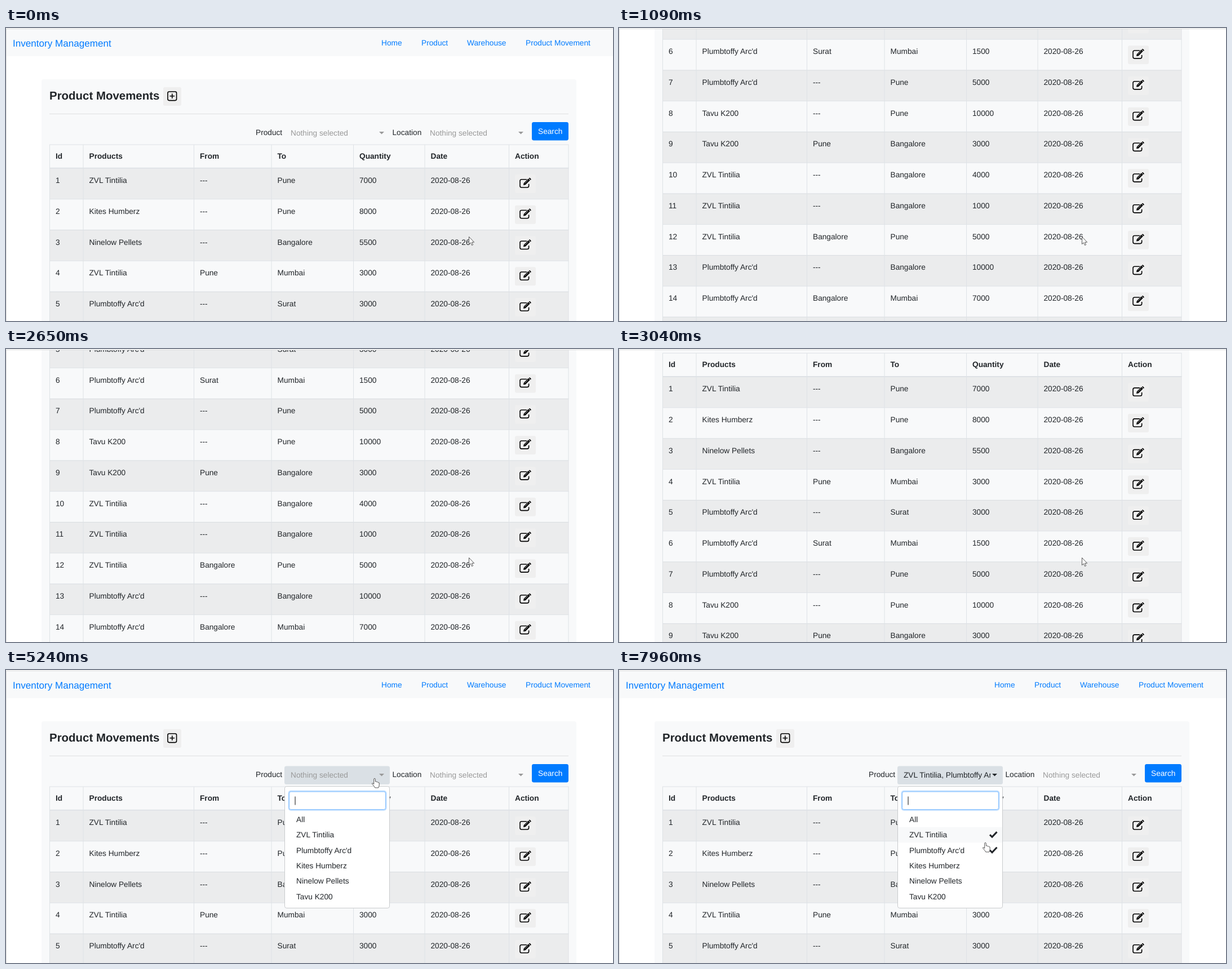
An HTML page that plays this animation: 1077 by 520 pixels, repeating every 8 s.

```html
<!DOCTYPE html>
<html lang="en">
<head>
<meta charset="utf-8">
<title>Inventory Management</title>
<style>
  html, body { margin: 0; width: 100%; height: 100%; overflow: hidden; background: #fff; }
  svg { display: block; width: 1077px; height: 520px; }
  text {
    font: 13.7px "Liberation Sans", Arial, sans-serif; fill: #212529;
    white-space: pre; text-rendering: geometricPrecision;
  }
  .bold { font-weight: bold; }
  .link { fill: #007bff; }
  .brand { font-size: 17.1px; fill: #007bff; }
  .title { font-size: 20.45px; font-weight: bold; }
  .hint { fill: #999; }
  .light { fill: #fff; }
</style>
</head>
<body>
<svg id="stage" viewBox="0 0 1077 520"></svg>
<script>
const PRODUCTS = ["ZVL Tintilia", "Plumbtoffy Arc'd", "Kites Humberz", "Ninelow Pellets", "Tavu K200"];
const CITIES = { "-": "---", P: "Pune", B: "Bangalore", M: "Mumbai", S: "Surat", H: "Hyderabad" };
// product index, from, to, quantity
const MOVES = ("0-P7000 2-P8000 3-B5500 0PM3000 1-S3000 1SM1500 1-P5000 4-P10000 " +
  "4PB3000 0-B4000 0-B1000 0BP5000 1-B10000 1BM7000 0PS1000 2-H1000").split(" ");
const HEADS = ["Id", "Products", "From", "To", "Quantity", "Date", "Action"];
const EDGES = [77.5, 137, 333.5, 471, 616.5, 743, 892.5, 998];
const ROW = 54.75, ROWS_TOP = 249, ITEM = 27.4, ITEMS_TOP = 251.5;
const LOOP = 8000, BOTTOM = 631.2;

const text = (x, y, s, cls = "", more = "") => `<text x="${x}" y="${y}" class="${cls}" ${more}>${s}</text>`;
const rect = (x, y, w, h, fill, more = "") =>
  `<rect x="${x}" y="${y}" width="${w}" height="${h}" fill="${fill}" ${more}/>`;
const line = (d, color = "#dee2e6", w = 1) => `<path d="${d}" stroke="${color}" stroke-width="${w}" fill="none"/>`;
const arrow = (x, id) => `<path id="${id}" d="M${x} 184h9l-4.5 4.6z" fill="#999"/>`;
const cellX = i => EDGES[i] + 10.5;

const editButton = y => rect(903, y + 11, 37, 33, "#efefef", 'rx="3"') +
  `<g transform="translate(911 ${y + 17})">` +
  line("M13 2.8H3.8Q1 2.8 1 5.6v8.6q0 2.8 2.8 2.8h10q2.8 0 2.8-2.8V10.8", "#000", 1.6) +
  '<path d="M7 12.9l.7-3.6 8.1-8.1 3 3-8.1 8.1zM16.7 .8l.8-.7q.6-.5 1.2 0l1.8 1.8q.6.6 0 1.2l-.8.8z"/>' +
  line("M9.5 9.8l5.8-5.8", "#efefef", .7) + "</g>";

const tableRow = (code, i) => {
  const y = ROWS_TOP + i * ROW;
  const cells = [i + 1, PRODUCTS[code[0]], CITIES[code[1]], CITIES[code[2]], code.slice(3), "2020-08-26"];
  return (i % 2 ? "" : rect(77.5, y, 920.5, ROW, "#000", 'opacity=".05"')) +
    line(`M77 ${y + ROW}H998.5`) +
    cells.map((s, c) => text(cellX(c), y + 26, s)).join("") + editButton(y);
};

const tableEnd = ROWS_TOP + MOVES.length * ROW;
const page = rect(0, 0, 1077, 50, "#f8f9fa") +
  text(12, 32.5, "Inventory Management", "brand") +
  [[666, "Home"], [737, "Product"], [818, "Warehouse"], [922, "Product Movement"]]
    .map(([x, s]) => text(x, 31, s, "link")).join("") +
  rect(63, 91, 949, 1120, "#f8f9fa", 'rx="4"') +
  text(77, 127, "Product Movements", "title") +
  rect(279, 105, 32, 33, "#efefef", 'rx="3"') +
  rect(287, 113, 15.6, 15.6, "none", 'rx="2.5" stroke="#000" stroke-width="1.6"') +
  line("M290.5 120.8h8.6M294.8 116.5v8.6", "#000", 1.6) +
  line("M77 152.5H998", "#dfe0e1") +
  rect(494, 170.5, 187, 32.5, "none", 'id="select" rx="3.4"') +
  text(443, 190, "Product") + text(505, 191, "Nothing selected", "hint", 'id="choice" clip-path="url(#choiceBox)"') +
  arrow(662, "choiceArrow") +
  text(685.5, 190, "Location") + text(752, 191, "Nothing selected", "hint") + arrow(909, "placeArrow") +
  rect(933, 167, 65, 32.5, "#007bff", 'rx="3.4"') + text(944, 188, "Search", "light") +
  MOVES.map(tableRow).join("") +
  HEADS.map((s, i) => text(cellX(i), 232, s, "bold")).join("") +
  line(`M77 207H998.5M${EDGES.map(x => `${x} 207V${tableEnd}`).join("M")}`) +
  line("M77 248.7H998.5", "#dee2e6", 1.8);

const menu = rect(494.5, 206.5, 186, 216, "#fff", 'rx="3.4" stroke="#c9cbcd"') +
  rect(500.5, 213.8, 175, 36, "#bfdeff", 'rx="5"') +
  rect(502.5, 216, 171, 31.5, "#fff", 'rx="3" stroke="#80bdff"') +
  rect(512.5, 224.5, 1.1, 15, "#222", 'id="typing"') +
  rect(495, 0, 185, ITEM, "#f8f9fa", 'id="hover"') +
  rect(494.7, 0, 185.8, ITEM, "#007bff", 'id="pressed" stroke="#101010" stroke-width="1.3"') +
  ["All", ...PRODUCTS].map((s, i) =>
    text(515, ITEMS_TOP + i * ITEM + 18.3, s, "", `id="item${i}"`)).join("") +
  [1, 2].map(i => `<path id="check${i}" d="M658 ${ITEMS_TOP + i * ITEM + 13.5}l4 4 8.5-9" ` +
    'fill="none" stroke="#212529" stroke-width="3"/>').join("");

document.getElementById("stage").innerHTML =
  '<clipPath id="choiceBox"><rect x="504" y="172" width="155.5" height="30"/></clipPath>' +
  `<g id="page">${page}</g><g id="menu">${menu}</g>` +
  rect(0, 0, 1077, 1, "#fff") + line("M0 1.5H1077M.5 1V520", "#dcdddd") +
  '<circle id="ring" r="10.5" fill="#c3d22d" opacity=".72"/>' +
  '<g id="cursor" fill="#fff" stroke="#444" stroke-width=".9" stroke-linejoin="round">' +
  '<path id="pointer" d="M.5.5V13.6L3.4 10.9 5.5 15.6 7.6 14.7 5.6 10.2H9.6Z"/>' +
  '<path id="hand" transform="translate(-5.3 0)" d="M4 10.5V1.8a1.3 1.3 0 0 1 2.6 0V6q2.2-.8 2.5.8 ' +
  '2-.6 2.3.8 2.1-.4 2.1 1.4V12q0 2-1.4 5H6Q5.5 15 1 10.4q-.6-1.8 1-1.6z"/></g>';

const el = id => document.getElementById(id);
const show = (id, on) => { el(id).style.display = on ? "" : "none"; };
const between = (t, a, b) => t >= a && t < b;

// Share of a stepped move done at time t; the first step lands on start
const stepped = (t, start, count, gap = 79) =>
  t < start ? 0 : Math.min(count, Math.floor((t - start) / gap + .1) + 1) / count;

function scrollAt(t) {
  if (t < 1320) return 614.3 * stepped(t, 450, 11);
  if (t < 1720) return 614.3 + 16 * (1 - (1 - stepped(t, 1320, 4, 76)) ** 1.6);
  return BOTTOM * (1 - stepped(t, 2490, 10)) ** .715;
}

// start, steps, destination x and y, ease-out power
const LEGS = [[3730, 11, 654, 192, 3], [5530, 9, 633, 285, 1.5], [6950, 5, 638, 311, 1.5], [7960, 1, 650, 306, 1]];
function cursorAt(t) {
  let x = 821, y = 370;
  for (const [start, count, toX, toY, power] of LEGS) {
    const p = 1 - (1 - stepped(t, start, count)) ** power;
    x += (toX - x) * p;
    y += (toY - y) * p;
  }
  return [x, y];
}

function draw(t) {
  el("page").setAttribute("transform", `translate(0 ${-scrollAt(t)})`);

  const [x, y] = cursorAt(t), onSelect = t >= 4355;
  el("cursor").setAttribute("transform", `translate(${x} ${y})`);
  show("pointer", !onSelect);
  show("hand", onSelect);
  el("ring").setAttribute("transform", `translate(${x} ${y + 2})`);
  show("ring", [4830, 6390, 7420].some(c => between(t, c, c + 235)));

  el("select").setAttribute("fill",
    t >= 4830 ? "#dae0e5" : t >= 4440 ? "#e2e6ea" : onSelect ? "#fafbfc" : "none");
  const picked = t >= 7580 ? 2 : t >= 6550 ? 1 : 0;
  el("choice").textContent = picked ? PRODUCTS.slice(0, picked).join(", ") : "Nothing selected";
  el("choice").setAttribute("class", picked ? "" : "hint");
  el("choiceArrow").setAttribute("fill", picked ? "#212529" : "#999");

  show("menu", t >= 4990);
  const pressed = between(t, 6390, 6550) ? 1 : between(t, 7420, 7580) ? 2 : 0;
  const hover = Math.floor((y - ITEMS_TOP) / ITEM);
  el("hover").setAttribute("y", ITEMS_TOP + hover * ITEM);
  el("pressed").setAttribute("y", ITEMS_TOP + pressed * ITEM);
  show("hover", hover >= 0);
  show("pressed", pressed);
  for (const i of [1, 2]) {
    el("item" + i).setAttribute("class", pressed === i ? "light" : "");
    show("check" + i, picked >= i);
  }
  show("typing", between(t, 5150, 5650) || between(t, 6160, 6390) || between(t, 6550, 7050) || t >= 7580);
}

function tick() {
  draw(performance.now() % LOOP);
  requestAnimationFrame(tick);
}
tick();
</script>
</body>
</html>
```
